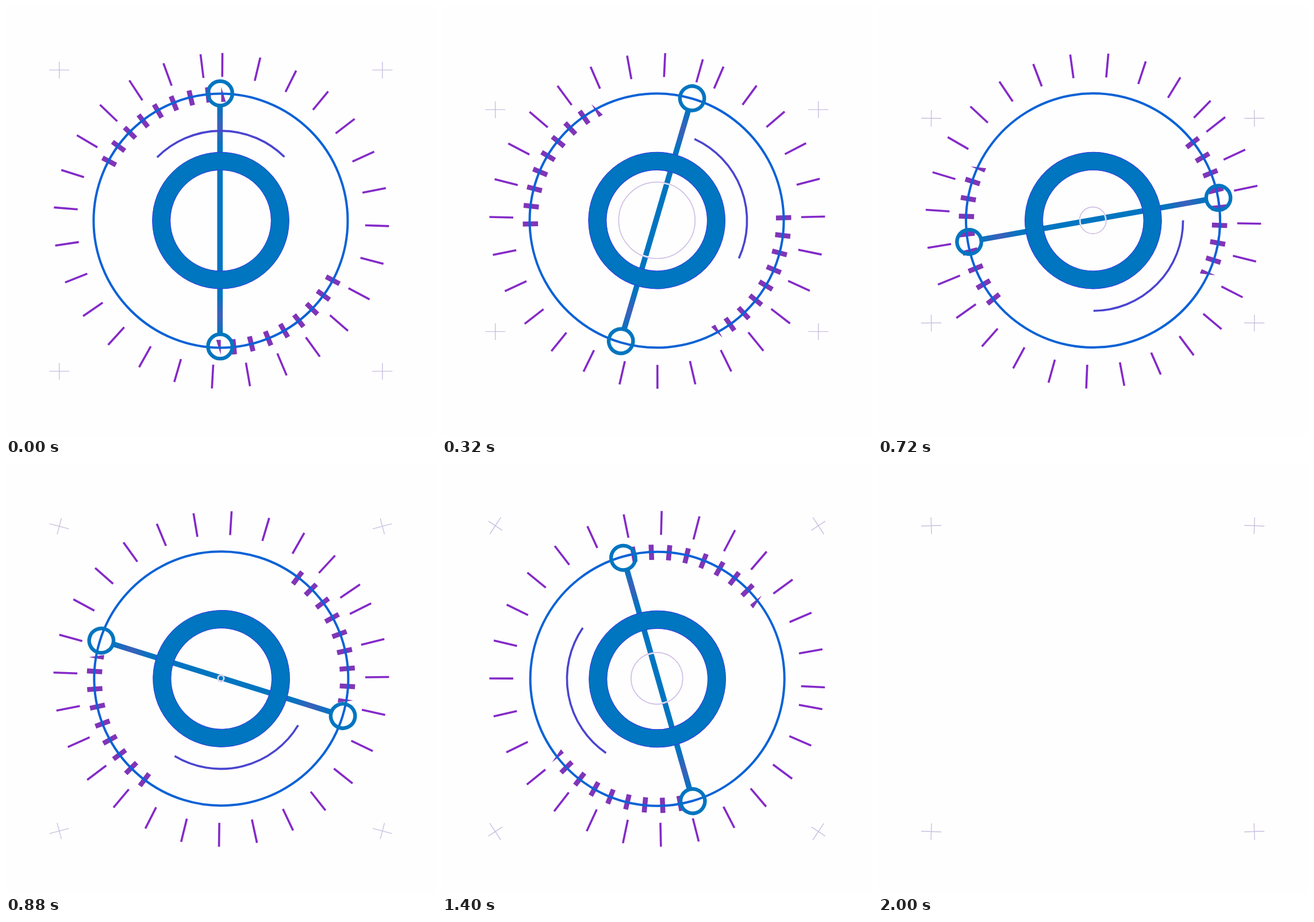
An HTML page with a canvas that plays this animation: 748x748 px, repeating every 2.04 s.

```html
<!DOCTYPE html>
<html>
<head>
<meta charset="utf-8">
<style>
html, body { margin: 0; width: 100%; height: 100%; overflow: hidden; background: #fefefe; }
canvas { display: block; }
</style>
</head>
<body>
<canvas id="stage" width="748" height="748"></canvas>
<script>
const ctx = document.getElementById('stage').getContext('2d');
const LOOP = 2040, STEP = 40, TURN = 1960, CX = 374, CY = 373.7, TAU = Math.PI * 2;
const BLUE = '#0075c0', LINE = '#0a62d6', EDGE = '#3a36e6', PURPLE = '#842ac8', BLOCK = '#8035b8', LILAC = '#c9bfe0';
const rad = deg => deg * Math.PI / 180;
const clamp = v => Math.min(1, Math.max(0, v));

// Bezier easing with handles (x1, 0) and (x2, 1)
function ease(x, x1, x2) {
  let lo = 0, hi = 1;
  for (let i = 0; i < 24; i++) {
    const s = (lo + hi) / 2, r = 1 - s;
    if (3 * x1 * s * r * r + 3 * x2 * s * s * r + s * s * s < x) lo = s; else hi = s;
  }
  return lo * lo * (3 - 2 * lo);
}

function track(t, keys) {
  const i = keys.findIndex(k => k[0] > t);
  if (i < 0) return keys[keys.length - 1][1];
  const [t0, a] = keys[i - 1], [t1, b] = keys[i];
  return a + (b - a) * (t - t0) / (t1 - t0);
}

function arc(x, y, r, color, width, from = 0, to = TAU) {
  ctx.beginPath();
  ctx.arc(x, y, r, from, to);
  ctx.strokeStyle = color;
  ctx.lineWidth = width;
  ctx.stroke();
}

// Draws around (x, y), turned clockwise by deg
function turned(x, y, deg, draw) {
  ctx.save();
  ctx.translate(x, y);
  ctx.rotate(rad(deg));
  draw();
  ctx.restore();
}

const SLIDE = [[0, 4], [320, 73], [560, 137], [640, 155], [720, 88], [800, 22], [880, 1], [960, 0]];
const SWEEP = [[0, 0], [320, 69.8], [560, 103.6], [880, 166.2], [1400, 259.7], [1720, 317.3], [1960, 360]];

function crosses(t) {
  const shift = track(t, SLIDE);
  const spin = 180 * ease(clamp((t - 680) / 1480), .28, .38);
  ctx.strokeStyle = LILAC;
  ctx.lineWidth = 1.4;
  for (const sx of [-1, 1]) for (const sy of [-1, 1]) {
    turned(373.7 + sx * 281, 373.4 + sy * (266 - shift), spin * sx * sy, () => {
      ctx.beginPath();
      ctx.moveTo(-17.5, 0); ctx.lineTo(17.5, 0);
      ctx.moveTo(0, -14.5); ctx.lineTo(0, 14.5);
      ctx.stroke();
    });
  }
}

function rays(t) {
  ctx.fillStyle = PURPLE;
  for (let i = 0; i < 28; i++)
    turned(CX + .4, CY, .4 + 140 * t / TURN + i * 13.056, () => ctx.fillRect(-1.8, -292, 3.6, 41.5));
}

function blocks(t) {
  ctx.fillStyle = BLOCK;
  for (const half of [0, 180]) {
    const base = half - 180 * t / TURN;
    for (let i = 0; i < 8; i++)
      turned(CX, CY, base - 62 + i * 8.03, () => ctx.fillRect(-4.3, -233.5, 8.6, 26.5));
    turned(CX, CY, base, () => {
      ctx.beginPath();
      ctx.moveTo(.4, -233); ctx.lineTo(8.4, -207); ctx.lineTo(.4, -207);
      ctx.fill();
    });
  }
}

function rod() {
  const g = ctx.createLinearGradient(0, -200, 0, 200);
  [[0, BLUE], [.09, '#3c60bb'], [.18, BLUE], [.82, BLUE], [.91, '#3c60bb'], [1, BLUE]]
    .forEach(([at, color]) => g.addColorStop(at, color));
  ctx.fillStyle = g;
  ctx.fillRect(-6.6, -199, 9.6, 397);
  for (const y of [-221.7, 218.5]) arc(-1.4, y, 21.2, BLUE, 6.4);
}

function ring() {
  arc(-.5, -.5, 103.3, BLUE, 31.4);
  for (const r of [87.8, 118.8]) arc(-.5, -.5, r, EDGE, 1);
}

function draw(t) {
  ctx.fillStyle = '#fefefe';
  ctx.fillRect(0, 0, 748, 748);
  crosses(t);
  if (t >= 2000) return;
  rays(t);
  blocks(t);
  const turn = 180 * ease(clamp(t / TURN), .336, .387);
  turned(CX, CY, turn, () => {
    arc(-.6, -.2, 221, LINE, 4);
    rod();
  });
  // Thin circle shrinks to the middle, then grows back under the ring
  const r = t < 940 ? Math.max(0, 101 - .108 * t) : Math.max(0, (t - 950) * .1);
  if (r > 2) {
    arc(CX - .2, CY - .9, r - 1.2, '#fefefe', 1.6);
    arc(CX - .2, CY - .9, r, '#d0c0e6', 1.7);
  }
  turned(CX, CY, turn, ring);
  const start = rad(track(t, SWEEP) - 135.2);
  arc(CX, CY, 156.6, '#4a45d0', 3.6, start, start + rad(90));
}

function frame() {
  const t = performance.now() % LOOP;
  draw(Math.floor(t / STEP) * STEP);
  requestAnimationFrame(frame);
}
frame();
</script>
</body>
</html>
```
